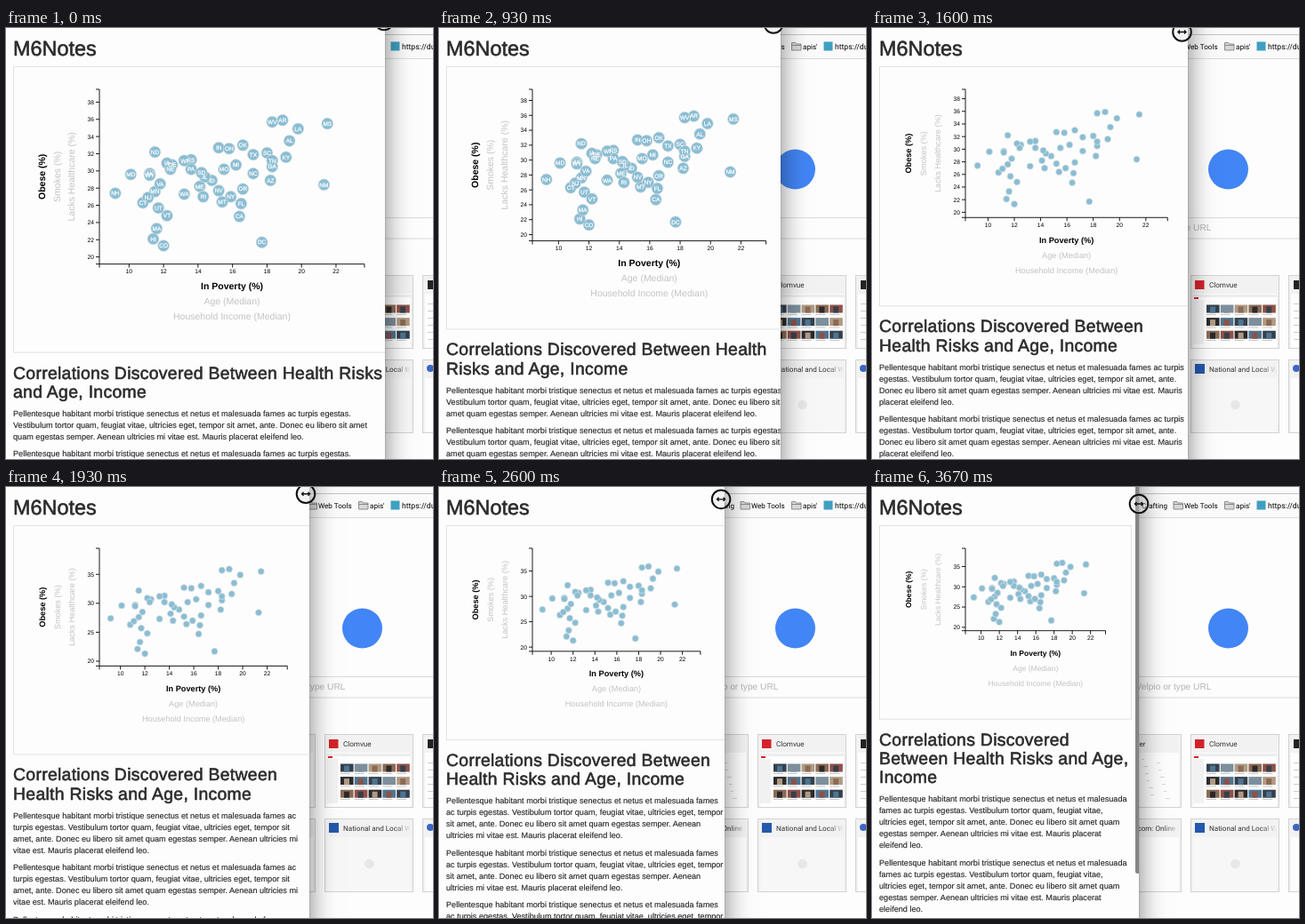
An HTML page that plays this animation: 480 px wide and 485 px high, repeating every 3740 ms.

```html
<!DOCTYPE html>
<html lang="en">
<head>
<meta charset="utf-8">
<title>Responsive scatter plot</title>
<style>
  html, body { margin: 0; width: 100%; height: 100%; overflow: hidden; background: #fdfdfd; }
  body { position: relative; font-family: "Liberation Sans", Arial, sans-serif; color: #2b2b2b; text-rendering: geometricPrecision; }
  #back, #cursor { position: absolute; left: 0; top: 0; width: 480px; height: 485px; }
  #back { font: 8.1px Roboto, sans-serif; }
  #window { position: absolute; left: 0; top: -60px; height: 620px; overflow: hidden; background: #fdfdfd;
    box-shadow: 0 9px 28px rgba(0,0,0,.5), 0 0 1px rgba(0,0,0,.5); }
  #page { position: absolute; left: 8px; top: 71px; }
  #thumb { position: absolute; top: 0; width: 5px; height: 495px; border-radius: 3px; background: #858587; }
  #chart { display: block; overflow: visible; }
  h1, h2 { font-weight: 400; -webkit-text-stroke: .6px #2b2b2b; }
  h1 { margin: 0 0 6.5px; font-size: 23.4px; line-height: 25.5px; }
  h2 { margin: 13px 0 6.5px; font-size: 19.4px; line-height: 21.4px; letter-spacing: .3px; }
  p { margin: 0 0 6.5px; font-size: 9.12px; line-height: 13px; color: #222; -webkit-text-stroke: .12px #222; }
</style>
</head>
<body>
<svg id="back"></svg>
<div id="window">
  <div id="page">
    <h1>M6Notes</h1>
    <svg id="chart"></svg>
    <h2>Correlations Discovered Between Health Risks and Age, Income</h2>
  </div>
  <div id="thumb"></div>
</div>
<svg id="cursor"><g id="pointer">
  <circle r="10.3" fill="#ddd" fill-opacity=".3" stroke="#111" stroke-width="2"/>
  <path d="M-4 0H4M-2.5 -2L-4.5 0L-2.5 2M2.5 -2L4.5 0L2.5 2" fill="none" stroke="#111" stroke-width="1.4"/>
</g></svg>
<script>
const $ = id => document.getElementById(id);
const rect = (x, y, w, h, fill, extra = '') => `<rect x="${x}" y="${y}" width="${w}" height="${h}" fill="${fill}" ${extra}/>`;
const text = (x, y, str, extra = '') => `<text x="${x}" y="${y}" ${extra}>${str}</text>`;
const circle = (x, y, r, extra) => `<circle cx="${x}" cy="${y}" r="${r}" ${extra}/>`;

// Browser behind the resized window; each tile clips and fades its title
function tile(x, y, title, titleX, content) {
  return rect(x + .5, y + .5, 99, 82, '#f2f2f2', 'stroke="#d2d2d2"') + rect(x + 3, y + 21, 94, 61, '#fdfdfd') +
    `<svg x="${x}" y="${y}" width="99" height="20">${text(titleX, 13.5, title, 'fill="#333"')}${rect(79, 2, 20, 18, 'url(#fade)')}</svg>` +
    content;
}
function drawBack() {
  const folder = x => `<path d="M${x} 16.5h4l1 1.5h5.5v7h-10.5zM${x} 19.5h10.5" fill="#d8d8d8" stroke="#777" stroke-width=".8"/>`;
  const tones = ['#35404c', '#8b6a54', '#4d7590', '#b09a82', '#2a2a2c', '#7d8f9c', '#8e5148'];
  let out = `<defs><linearGradient id="fade"><stop stop-color="#f2f2f2" stop-opacity="0"/><stop offset=".9" stop-color="#f2f2f2"/></linearGradient></defs>`;
  out += rect(0, 0, 480, 34, '#fafafa') + rect(0, 7, 480, 1, '#c4c4c4') + rect(0, 34, 480, 1, '#dcdcdc');
  out += text(332, 23.5, 'Crafting', 'text-anchor="end"') + folder(339) + text(351, 23.5, 'Web Tools') +
    folder(396.5) + text(409, 23.5, "apis'") + rect(432.5, 15.5, 10, 10, '#3f9fc0') + text(445, 23.5, 'https://du', 'font-size="8.6"');
  out += circle(400.5, 159, 22.5, 'fill="#4285f4"');
  out += rect(240, 213.5, 260, 23.5, '#fdfdfd', 'stroke="#dadada"') +
    text(381.5, 228.3, 'Search Velpio or type URL', 'text-anchor="end" fill="#b4b4b4" font-family="Liberation Sans, sans-serif" font-size="10.2"');

  let lines = '', films = rect(361, 300, 94, 3, '#ededed') + rect(362, 303, 5, 2, '#d3222a') + rect(361, 306, 12, 50, '#f1f1f1');
  for (let i = 0; i < 12; i++) lines += rect(303 + i * 17 % 32, 306 + i * 4, 3 + i % 3, 1, '#d5d5d5');
  for (let i = 0; i < 15; i++) {
    const x = 376 + i % 5 * 15.8, y = 311.5 + Math.floor(i / 5) * 14.6;
    films += rect(x, y, 14.6, 9, tones[i * 5 % 7]) + rect(x + 4, y + 2, 6, 7, tones[(i * 3 + 2) % 7]) +
      rect(x, y + 10.5, 11, .8, '#bbb');
  }
  out += tile(248, 278, 'Pebbler', 32, lines);
  out += tile(248, 373, 'Zelvano.com: Online Shop', 20, '');
  out += tile(358, 278, 'Clomvue', 21, rect(363, 284, 10.5, 10, '#d3222a') + films);
  out += tile(358, 373, 'National and Local Weather', 21,
    rect(363, 378, 11, 11, '#2458ab') + rect(361, 394, 94, 61, '#f7f7f7') + circle(408.5, 424, 5.3, 'fill="#e7e7e7"'));
  out += tile(468, 278, '', 0, rect(474, 284, 10, 10, '#222')) + tile(468, 373, '', 0, circle(477, 383, 4, 'fill="#3c66c4"'));
  for (let i = 0; i < 6; i++) out += rect(474, 310 + i * 8, 8, 1, '#ccc');
  $('back').innerHTML = out;
}

// State, poverty %, obesity %
const states = `AL 19.3 33.5,AK 11.2 29.7,AZ 18.2 28.9,AR 18.9 35.9,CA 16.4 24.7,CO 12 21.3,CT 10.8 26.3,DE 12.5 30.7,
DC 17.7 21.7,FL 16.5 26.2,GA 18.3 30.5,HI 11.4 22.1,ID 14.8 28.9,IL 14.4 29.3,IN 15.2 32.7,IA 12.2 30.9,KS 13.6 31.3,
KY 19.1 31.6,LA 19.8 34.9,ME 14.1 28.2,MD 10.1 29.6,MA 11.6 23.3,MI 16.2 30.7,MN 11.5 27.6,MS 21.5 35.5,MO 15.5 30.2,
MT 15.4 26.4,NE 12.4 30.2,NV 15.2 27.7,NH 9.2 27.4,NJ 11.1 26.9,NM 21.3 28.4,NY 15.9 27,NC 17.2 29.7,ND 11.5 32.2,
OH 15.8 32.6,OK 16.6 33,OR 16.6 27.9,PA 13.6 30.2,RI 14.3 27,SC 18 32.1,SD 14.2 29.8,TN 18.3 31.2,TX 17.2 31.9,
UT 11.7 25.7,VT 12.2 24.8,VA 11.8 28.5,WA 13.2 27.3,WV 18.3 35.7,WI 13.2 31.2,WY 11.2 29.5`
  .split(',').map(row => row.trim().split(' '));

function drawChart(width) {
  const left = 97, top = 26, plotW = width * 1.04 - 137.8, plotH = width * .77 - 126;
  const right = left + plotW, bottom = top + plotH, large = width > 368;
  const sx = v => left + (v - 8.28) / 15.37 * plotW;
  const sy = v => bottom - (v - 19.17) / 20.32 * plotH;
  const step = plotH > 133 ? 2 : 5;
  const size = large ? 10.5 : width > 294 ? 9.2 : 8.5;
  let dots = '', names = '', ticks = '', numbers = '', titles = '';
  for (const [name, x, y] of states) {
    dots += circle(sx(x), sy(y), large ? 6.5 : 3.6);
    if (large) names += text(sx(x), sy(y) + 2.3, name);
  }
  for (let v = 10; v <= 22; v += 2) {
    ticks += `M${sx(v)} ${bottom}v4`;
    numbers += text(sx(v), bottom + 10.7, v, 'text-anchor="middle"');
  }
  for (let v = 20; v < 39.4; v += step) {
    ticks += `M${left} ${sy(v)}h-4`;
    numbers += text(left - 6, sy(v) + 2.4, v, 'text-anchor="end"');
  }
  const style = i => i ? 'fill="#c3c3c3"' : 'fill="#000" font-weight="bold"';
  ['In Poverty (%)', 'Age (Median)', 'Household Income (Median)'].forEach((label, i) =>
    titles += text(left + plotW / 2, bottom + 28.5 + i * 17, label, style(i)));
  ['Obese (%)', 'Smokes (%)', 'Lacks Healthcare (%)'].forEach((label, i) =>
    titles += text(0, 0, label, `${style(i)} transform="translate(${36 + i * 16.7} ${top + plotH / 2}) rotate(-90)"`));
  const chart = $('chart');
  chart.setAttribute('width', width);
  chart.setAttribute('height', plotH + 126);
  chart.innerHTML = rect(.5, .5, width - 1, plotH + 125, 'none', 'stroke="#e2e2e2"') +
    `<g fill="#89bdd3" stroke="#e3e3e3" stroke-width=".65">${dots}</g>
    <g fill="#fff" stroke="#fff" stroke-width=".25" font-size="6.5" text-anchor="middle">${names}</g>
    <path d="M${left - 4} ${top}h4V${bottom}h-4M${left} ${bottom + 4}v-4H${right}v4${ticks}" fill="none" stroke="#000" stroke-width=".9"/>
    <g font-size="6.7" fill="#000">${numbers}</g><g font-size="${size}" text-anchor="middle">${titles}</g>`;
}

// Monotone cubic through the key times
const times = [0, 600, 930, 1600, 2270, 3000, 3670];
function track(values) {
  const secant = times.slice(1).map((t, i) => (values[i + 1] - values[i]) / (t - times[i]));
  const slope = i => {
    if (i === 0) return 0;
    if (i === 6) return secant[5];
    const [a, b] = [secant[i - 1], secant[i]];
    return a * b > 0 ? 2 * a * b / (a + b) : 0;
  };
  return t => {
    let i = 0;
    while (i < 5 && t >= times[i + 1]) i++;
    const span = times[i + 1] - times[i], u = Math.min(1, (t - times[i]) / span), w = 1 - u;
    return values[i] * w * w * (1 + 2 * u) + values[i + 1] * u * u * (3 - 2 * u) +
      span * u * w * (slope(i) * w - slope(i + 1) * u);
  };
}
const windowWidth = track([426, 416, 384, 354.5, 329, 312, 300]);
const pageWidth = track([419, 402, 385, 351, 322.4, 305, 284]);
const pointerX = track([425, 407, 376, 348.5, 326.5, 308, 300]);
const pointerY = track([-8, -8.5, -4.5, 4.5, 10.8, 16.8, 19]);

let shown = -1;
function draw(now) {
  const step = Math.floor((now % 3740 + 3.4) * .015);
  if (step !== shown) {
    shown = step;
    const t = Math.round(step / .15) * 10, width = pageWidth(t);
    $('window').style.width = windowWidth(t) + 'px';
    $('page').style.width = width + 'px';
    $('thumb').style.left = width + 11.5 + 'px';
    $('pointer').setAttribute('transform', `translate(${pointerX(t)} ${pointerY(t)})`);
    drawChart(width);
  }
}

const lorem = 'Pellentesque habitant morbi tristique senectus et netus et malesuada fames ac turpis egestas. Vestibulum tortor quam, feugiat vitae, ultricies eget, tempor sit amet, ante. Donec eu libero sit amet quam egestas semper. Aenean ultricies mi vitae est. Mauris placerat eleifend leo.';
$('page').insertAdjacentHTML('beforeend', `<p>${lorem}</p>`.repeat(4));
drawBack();
const start = performance.now();
(function loop() {
  draw(performance.now() - start);
  requestAnimationFrame(loop);
})();
</script>
</body>
</html>
```
